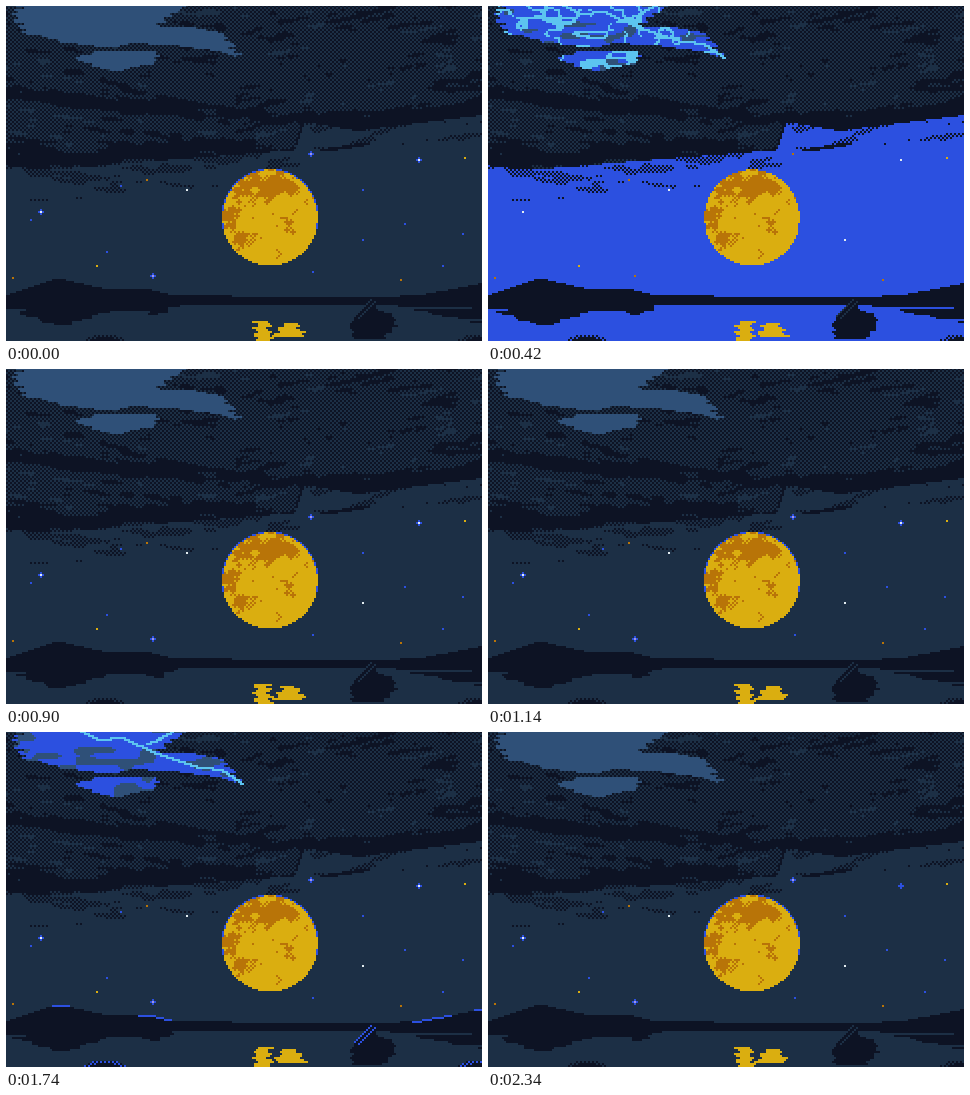
Write an HTML page with a canvas that moves like this. It is 476x335 px and loops after 2400 ms.

```html
<!DOCTYPE html>
<html lang="en">
<head>
<meta charset="utf-8">
<title>Moonlit storm</title>
<style>
html, body { margin: 0; width: 100%; height: 100%; overflow: hidden; background: #0d1324; }
canvas { position: absolute; left: 0; top: -1px; width: 476px; height: 336px; image-rendering: pixelated; }
</style>
</head>
<body>
<canvas id="stage" width="238" height="168"></canvas>
<script>
const W = 238, H = 168, STEP = 60, STEPS = 40;
const ctx = document.getElementById('stage').getContext('2d');
const image = ctx.createImageData(W, H);
const pixels = new Uint32Array(image.data.buffer);

const rgb = (r, g, b) => (255 << 24 | b << 16 | g << 8 | r) >>> 0;
const [SKY, NAVY, DARK, SLATE, BLUE, CYAN, YELLOW, ORANGE, WHITE, LILAC] = Array(10).keys();
const palette = [
  rgb(28, 47, 69), rgb(28, 47, 69), rgb(13, 19, 36), rgb(47, 80, 120), rgb(44, 80, 224),
  rgb(92, 196, 240), rgb(218, 174, 16), rgb(184, 116, 8), rgb(226, 236, 240), rgb(160, 150, 225)
];

const hash = (x, y) => {
  const s = Math.sin(x * 127.1 + y * 311.7) * 43758.5453;
  return s - Math.floor(s);
};
const mix = (a, b, t) => a + (b - a) * t;
function noise(x, y) {
  const i = Math.floor(x), j = Math.floor(y);
  const u = x - i, v = y - j, s = u * u * (3 - 2 * u), t = v * v * (3 - 2 * v);
  return mix(mix(hash(i, j), hash(i + 1, j), s), mix(hash(i, j + 1), hash(i + 1, j + 1), s), t);
}

// Shapes use stage coordinates; each cell covers 2 x 2 stage pixels.
let buf = new Uint8Array(W * H);
const put = (x, y, c) => {
  if (x >= 0 && x < W && y >= 0 && y < H) buf[y * W + x] = c;
};
const row = (x0, x1, y, c) => {
  for (let x = Math.round(x0); x <= Math.round(x1); x++) put(x, y, c);
};
const checker = (x, y) => (x + y) & 1;
const bell = (d, width) => Math.exp(-((d / width) ** 2));

function poly(points, c, rough = 0) {
  for (let y = 0; y < H; y++) {
    const sy = y * 2, cuts = [];
    points.forEach(([x0, y0], i) => {
      const [x1, y1] = points[(i + 1) % points.length];
      if ((y0 <= sy) !== (y1 <= sy)) {
        cuts.push(x0 + (sy - y0) / (y1 - y0) * (x1 - x0) + (hash(i, y) - .5) * rough);
      }
    });
    cuts.sort((a, b) => a - b);
    for (let i = 0; i + 1 < cuts.length; i += 2) row(cuts[i] / 2, cuts[i + 1] / 2 - 1, y, c);
  }
}
function line(points, c, thick = 1) {
  for (let i = 1; i < points.length; i++) {
    const [x0, y0] = points[i - 1], [x1, y1] = points[i];
    const n = Math.ceil(Math.max(Math.abs(x1 - x0), Math.abs(y1 - y0)) / 2);
    for (let k = 0; k <= n; k++) {
      const x = Math.floor(mix(x0, x1, k / n) / 2), y = Math.round(mix(y0, y1, k / n) / 2);
      row(x, x + thick - 1, y, c);
    }
  }
}
function heightAt(points, x) {
  const i = Math.max(1, points.findIndex(p => p[0] >= x));
  const [x0, y0] = points[i - 1], [x1, y1] = points[i];
  return mix(y0, y1, (x - x0) / (x1 - x0));
}

const cloudEdge = [[0, 160], [40, 164], [150, 155], [288, 144], [298, 116], [350, 125], [478, 109]];
const darkBand = [[0, 84], [200, 105], [350, 114], [478, 100]];

// Wind-drawn noise, darkened along one long band and along the lower left edge
function clouds() {
  for (let y = 0; y < 98; y++) for (let x = 0; x < W; x++) {
    const sx = x * 2, sy = y * 2, depth = sy - heightAt(cloudEdge, sx);
    const slant = sy + sx * (sx < 230 ? -.1 : .16);
    const n = noise(sx / 34 + 9, slant / 6) * .6 + noise(sx / 12, slant / 3) * .4;
    if (depth < 0) {
      const band = bell(sy - heightAt(darkBand, sx), 10);
      const hem = sx < 250 ? bell(depth + 8, 11) : bell(depth, 5);
      const v = .52 + (n - .5) * .85 + band * .4 + hem * .45;
      put(x, y, v > (checker(x, y) ? .3 : .7) ? DARK : NAVY);
    } else if (depth < 32 && checker(x, y) && n > .53 + depth / 200) {
      put(x, y, DARK);
    }
  }
  line([[314, 144], [334, 141], [352, 138]], DARK, 6);
  line([[318, 16], [348, 10], [380, 0]], DARK, 6);
}

const gaps = [
  [[8, 12], [15, 0], [176, 0], [166, 9], [150, 20], [190, 22], [215, 28], [236, 52],
    [214, 46], [170, 40], [130, 37], [105, 42], [60, 37], [20, 27]],
  [[70, 52], [92, 45], [150, 45], [152, 56], [110, 66], [86, 60]]
];
const ridge = [[0, 289], [45, 274], [60, 274], [100, 283], [145, 284], [165, 289], [350, 292], [415, 289], [478, 277]];
const shore = [[478, 303], [440, 300], [172, 298], [140, 304], [60, 308], [0, 302]];

// Seas fill the disc, leaving a bare area at the lower right
function moon() {
  for (let y = 80; y < 132; y++) for (let x = 106; x < 158; x++) {
    const sx = x * 2 + 1, sy = y * 2, r = Math.hypot(sx - 264, sy - 211);
    if (r > 48.6) continue;
    const bare = Math.hypot(sx - 285, sy - 239);
    const n = noise(sx / 13, sy / 13) * .65 + noise(sx / 4, sy / 4) * .35;
    const v = n + Math.min(bare, 60) / 110 - (r > 42 ? .12 : 0);
    const rim = r > 47.3 && sy < 226;
    put(x, y, rim ? BLUE : v > 1.02 || (v > .94 && checker(x, y)) ? ORANGE : YELLOW);
  }
}

clouds();
gaps.forEach(p => poly(p, SLATE, 10));
poly([...ridge, ...shore], DARK);
moon();
const base = buf;

const dots = [
  [BLUE, [[115, 180], [25, 214], [101, 246], [357, 184], [399, 218], [457, 228], [437, 260], [307, 266]]],
  [YELLOW, [[459, 152], [91, 260]]],
  [ORANGE, [[141, 174], [7, 272], [395, 274]]],
  [WHITE, [[181, 184]]]
];
const dot = (sx, sy, c) => put(sx >> 1, sy >> 1, c);
function cross(sx, sy, c) {
  for (const d of [-2, 2]) {
    dot(sx + d, sy, BLUE);
    dot(sx, sy + d, BLUE);
  }
  dot(sx, sy, c);
}
function stars(step, full) {
  for (const [c, list] of dots) for (const [x, y] of list) dot(x, y, c);
  dot(357, 234, step < 3 ? BLUE : WHITE);
  cross(35, 206, WHITE);
  cross(413, 154, step > 37 ? BLUE : WHITE);
  cross(305, 148, full ? ORANGE : LILAC);
  cross(147, 270, full ? ORANGE : LILAC);
}

function mound(cx, edge) {
  for (let y = 163; y < H; y++) for (let x = 0; x < W; x++) {
    const d = Math.hypot((x * 2 - cx) / 23, (y * 2 - 339) / 11);
    if (d < 1) put(x, y, d < .72 || checker(x, y) ? DARK : edge);
  }
}
function water(step, lit) {
  const sway = y => Math.sin(step / 20 * Math.PI * 2 + y * 1.9);
  for (let y = 150; y < 161; y++) {
    const k = y - 150, s = sway(y) * 2;
    if (hash(y, 4) > .2) row(k * 3 - 4 + s, 58 - k * 3 + s, y, DARK);
    if (k < 5) row(64 + k * 2 + s, 84 - k * 2 + s, y, DARK);
    if (k < 9 && hash(y, 7) > .3) row(194 + k * 5 + s, W, y, DARK);
  }
  // Moon glints: a narrow column beside one that widens downwards
  for (let y = 158; y < H; y++) {
    const s = sway(y) * 1.5, half = 2 + (y - 157) * .7;
    row(125 + s - hash(y, 1), 130 + s + hash(y, 2) * 2, y, YELLOW);
    if (hash(y, 3) > .25) row(142 - half + s, 141 + half + s, y, YELLOW);
  }
  poly([[343, 319], [352, 308], [366, 293], [372, 304], [385, 308], [389, 314], [388, 322], [343, 322]], DARK);
  for (let y = 160; y < 167; y++) row(165 + y / 20 + sway(y), 194 - (y - 160) + sway(y), y, DARK);
  for (const d of [0, 4]) line([[348 + d, 309 + d / 2], [364 + d, 293 + d / 2]], lit ? BLUE : NAVY);
  mound(98, lit ? BLUE : SKY);
  mound(472, lit ? BLUE : SKY);
}

const bolts = [
  [[75, 0], [92, 8], [115, 6], [150, 22], [190, 35], [215, 38], [235, 51]],
  [[140, 12], [152, 8], [165, 0]]
];
const ember = [[66, 98], [95, 98], [106, 103], [142, 103], [155, 112], [146, 122], [100, 117], [74, 106]];

// Light fills the cloud gaps; at full strength a web of veins runs through it
function lightGaps(full) {
  for (let y = 0; y < 34; y++) for (let x = 0; x < 120; x++) {
    if (buf[y * W + x] !== SLATE) continue;
    const n = noise(x / 10, y / 3), vein = noise(x / 8 + 30, y / 3.5);
    if (n > (full ? .25 : .36)) put(x, y, BLUE);
    if (full && Math.abs(vein - .5) < .07) put(x, y, CYAN);
  }
}
function rimLight() {
  for (let x = 46; x < 476; x += 2) {
    if ((x < 170 || x > 385) && noise(x / 18, 5) > .35) {
      put(x >> 1, Math.round(heightAt(ridge, x) / 2), BLUE);
    }
  }
}

const GLOW = 1, STRIKE = 2, FULL = 3, EMBER = 4;
const flashes = { 6: STRIKE, 7: FULL, 8: GLOW, 28: GLOW, 29: STRIKE, 30: GLOW, 34: EMBER, 35: EMBER };

function lightning(flash) {
  if (flash === EMBER) return poly(ember, BLUE, 16);
  if (flash) lightGaps(flash === FULL);
  if (flash > GLOW) bolts.forEach(p => line(p, CYAN, 2));
  if (flash === STRIKE) rimLight();
}

function render(step) {
  const flash = flashes[step] || 0, full = flash === FULL;
  buf = base.slice();
  stars(step, full);
  water(step, flash === STRIKE);
  lightning(flash);
  buf.forEach((c, i) => { pixels[i] = palette[full && c === SKY ? BLUE : c]; });
  ctx.putImageData(image, 0, 0);
}

const start = performance.now();
let shown = -1;
function tick() {
  const step = Math.floor((performance.now() - start) / STEP) % STEPS;
  if (step !== shown) render(shown = step);
  requestAnimationFrame(tick);
}
tick();
</script>
</body>
</html>
```
